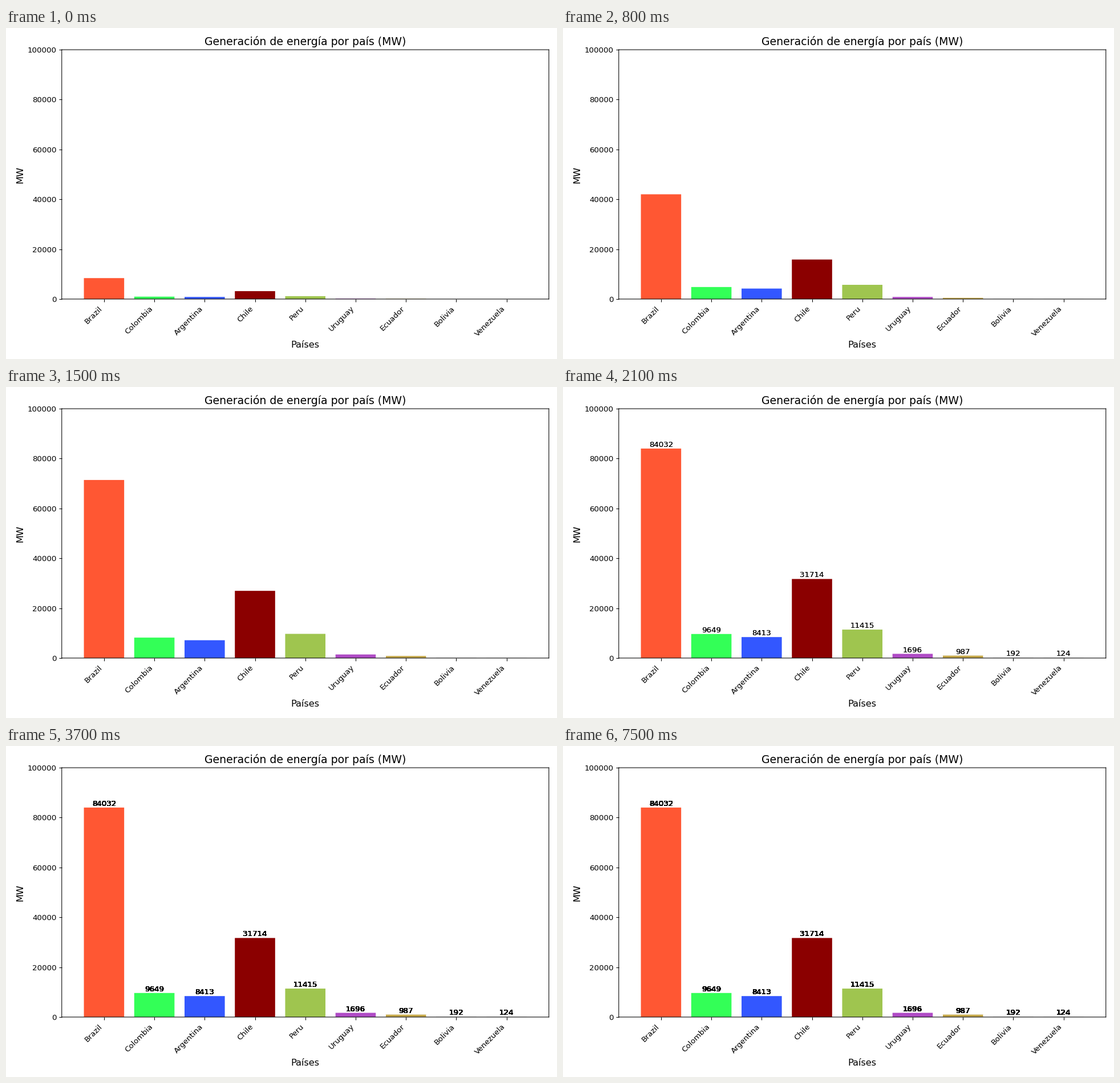
A matplotlib script that plays this animation: 966x580 px, repeating every 8000 ms.

```python
import matplotlib.pyplot as plt
from matplotlib.animation import FuncAnimation

W, H, DPI = 966, 580, 96.6
FRAMES, INTERVAL = 80, 100
LABEL_START = 20  # frame on which the value labels first appear

DATA = [
    ("Brazil", 84032, "#FF5733"),
    ("Colombia", 9649, "#33FF57"),
    ("Argentina", 8413, "#3357FF"),
    ("Chile", 31714, "#8B0000"),
    ("Peru", 11415, "#9FC54F"),
    ("Uruguay", 1696, "#AF4BC5"),
    ("Ecuador", 987, "#C5A84B"),
    ("Bolivia", 192, "#DDDDDD"),
    ("Venezuela", 124, "#DDDDDD"),
]
names, values, colors = zip(*DATA)

plt.rcParams["font.family"] = "DejaVu Sans"
fig = plt.figure(figsize=(W / DPI, H / DPI), dpi=DPI, facecolor="white")

left, right, top, bottom = 97.75, 951.75, 38.1, 474.95
ax = fig.add_axes([left / W, 1 - bottom / H,
                   (right - left) / W, (bottom - top) / H])

# Unsnapped edges keep the soft, sub-pixel look of the lines and bars.
bars = ax.bar(names, values, color=colors, snap=False)
for spine in ax.spines.values():
    spine.set_snap(False)

ax.set_ylim(0, 100000)
ax.set_title("Generación de energía por país (MW)", fontsize=14.05)
ax.set_xlabel("Países", fontsize=12)
ax.set_ylabel("MW", fontsize=12)
ax.tick_params(axis="x", pad=4)
plt.setp(ax.get_xticklabels(), rotation=45, ha="right")


def label_layer():
    return [ax.text(i, v, str(v), ha="center", va="bottom", fontsize=10,
                    visible=False)
            for i, v in enumerate(values)]


# The labels are stamped once more on every frame, so their edges thicken.
layers = [label_layer() for _ in range(FRAMES - LABEL_START)]


def update(frame):
    growth = min(1, (frame + 2) / 20)
    for bar, value in zip(bars, values):
        bar.set_height(value * growth)
    shown = frame - LABEL_START + 1
    for i, layer in enumerate(layers):
        for label in layer:
            label.set_visible(i < shown)
    return []


anim = FuncAnimation(fig, update, frames=FRAMES, interval=INTERVAL,
                     init_func=lambda: update(0), repeat=True,
                     repeat_delay=0, blit=False)
plt.show()
```
